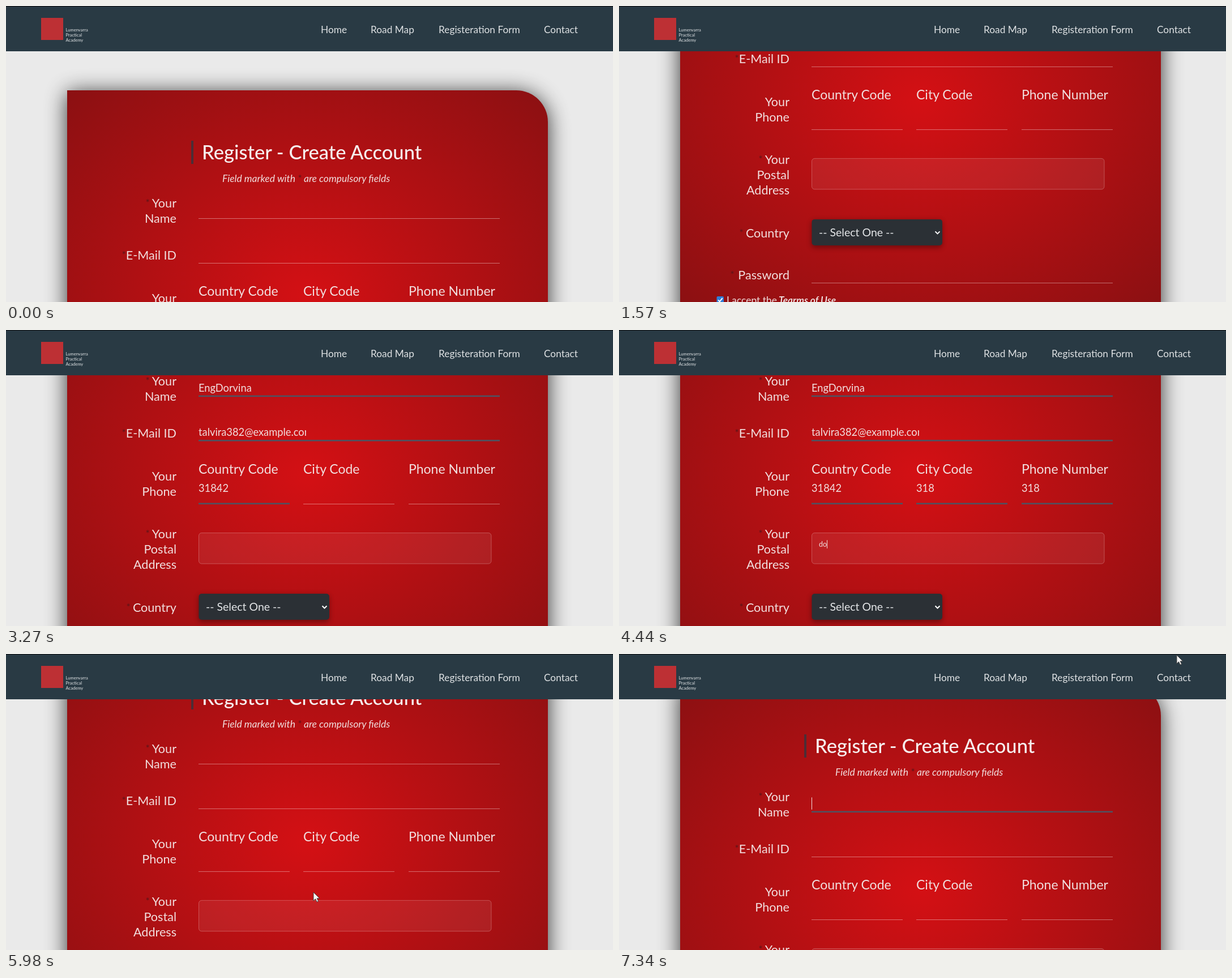
Write an HTML page that moves like this. It is 1072 px wide and 523 px high and loops after 7440 ms.

```html
<!DOCTYPE html>
<html lang="en">
<head>
<meta charset="utf-8">
<title>Register</title>
<style>
html, body { margin: 0; width: 100%; height: 100%; overflow: hidden; background: #eaeaea; }
svg { display: block; width: 1072px; height: 523px; }
text { font-family: Lato, "Open Sans", sans-serif; fill: #f1dede; white-space: pre; }
.nav text, .foot text { fill: #dfe2e4; }
</style>
</head>
<body>
<svg id="stage" viewBox="0 0 1072 523">
  <defs>
    <radialGradient id="glow" r="0.7071">
      <stop offset="0" stop-color="#d41014"/>
      <stop offset="1" stop-color="#8b1012"/>
    </radialGradient>
    <filter id="soft" x="-20%" y="-20%" width="140%" height="140%"><feGaussianBlur stdDeviation="19"/></filter>
    <filter id="softSmall" x="-20%" y="-50%" width="140%" height="200%"><feGaussianBlur stdDeviation="5"/></filter>
    <clipPath id="cardClip"><path id="cardShape"/></clipPath>
    <clipPath id="emailClip"><rect x="338" y="420" width="192" height="40"/></clipPath>
  </defs>
  <rect width="1072" height="523" fill="#eaeaea"/>
  <g id="page"></g>
  <g id="header" class="nav"></g>
  <g id="arrow"><path d="M0 0V15L3.6 11.7L6 17L8.6 15.9L6.2 10.8H10.8Z" fill="#f4f4f4" stroke="#444" stroke-width="1"/></g>
  <g id="hand"><path d="M-2 1C-2-1 1.5-1 1.5 1V7L8 8.5Q10 9 10 11L9 18H0L-6 11C-6 9-4 8.5-2 11Z" fill="#f6f6f6" stroke="#555" stroke-width=".7"/></g>
</svg>
<script>
const LOOP = 7440, RELOAD = 5850, REFOCUS = 6610;
const $ = id => document.getElementById(id);
const page = $('page'), header = $('header');

function add(parent, tag, attrs, content) {
  const el = document.createElementNS('http://www.w3.org/2000/svg', tag);
  set(el, attrs);
  if (content !== undefined) el.textContent = content;
  parent.append(el);
  return el;
}
function set(el, attrs) {
  for (const key in attrs) el.setAttribute(key, attrs[key]);
}
// y is the middle of the capital letters
function label(parent, x, y, size, content, attrs = {}) {
  return add(parent, 'text', { x, y: y + size * 0.36, 'font-size': size, ...attrs }, content);
}
function roundBox(x, y, w, h, [tl, tr, br, bl]) {
  return `M${x + tl} ${y}h${w - tl - tr}a${tr} ${tr} 0 0 1 ${tr} ${tr}v${h - tr - br}` +
    `a${br} ${br} 0 0 1 ${-br} ${br}h${br + bl - w}a${bl} ${bl} 0 0 1 ${-bl} ${-bl}` +
    `v${bl + tl - h}a${tl} ${tl} 0 0 1 ${tl} ${-tl}z`;
}
// rows are [time, value, value...]; linear between rows
function track(rows, t) {
  const i = rows.findIndex(row => row[0] > t);
  if (i < 0) return rows.at(-1).slice(1);
  if (i === 0) return rows[0].slice(1);
  const a = rows[i - 1], b = rows[i], k = (t - a[0]) / (b[0] - a[0]);
  return a.slice(1).map((v, n) => v + (b[n + 1] - v) * k);
}

const END = { 'text-anchor': 'end' }, MID = { 'text-anchor': 'middle' };

// Card
const cardPath = roundBox(108, 149, 849, 893.5, [0, 56, 0, 56]);
set($('cardShape'), { d: cardPath });
add(page, 'path', { d: cardPath, opacity: 0.78, filter: 'url(#soft)', transform: 'translate(0 4)' });
const card = add(page, 'g', { 'clip-path': 'url(#cardClip)' });
add(card, 'rect', { x: 108, y: 149, width: 849, height: 728, fill: 'url(#glow)' });
add(card, 'rect', { x: 108, y: 876, width: 849, height: 167, fill: 'url(#glow)' });

// Headings and labels
add(page, 'rect', { x: 327, y: 238, width: 4, height: 41, fill: '#293a44', opacity: 0.72 });
label(page, 346, 258.5, 34.6, 'Register - Create Account', { 'font-weight': 500, style: 'fill:#f6eeee' });
label(page, 382, 305, 17.5, 'Field marked with', { 'font-style': 'italic' });
label(page, 526, 305, 17.5, 'are compulsory fields', { 'font-style': 'italic' });
[['Your', 348], ['Name', 375], ['E-Mail ID', 440], ['Your', 516], ['Phone', 543], ['Your', 618],
  ['Postal', 645], ['Address', 672], ['Country', 748], ['Password', 822]]
  .forEach(([name, y]) => label(page, 301, y, 21.6, name, END));
[[340, 'Country Code'], [525, 'City Code'], [711, 'Phone Number']]
  .forEach(([x, name]) => label(page, x, 504, 23, name));
[[250, 348], [208, 440], [250, 618], [216, 748], [200, 822], [519, 305]]
  .forEach(([x, y]) => label(page, x, y, 17, '*', { ...MID, style: 'fill:#5c1519' }));

// Inputs
add(page, 'rect', { x: 340.5, y: 616.5, width: 516.5, height: 54.5, rx: 5,
  fill: '#fff', 'fill-opacity': 0.065, stroke: '#fff', 'stroke-opacity': 0.25 });
const fields = [
  { x: 340, y: 360, line: 375, width: 532, value: 'EngDorvina', from: 1830, to: 2480 },
  { x: 340, y: 438, line: 453.5, width: 532, value: 'talvira382@example.com', from: 2580, to: 2900, clip: 'url(#emailClip)' },
  { x: 340, y: 537, line: 565, width: 161, value: '31842', from: 3080, to: 3270 },
  { x: 525, y: 537, line: 565, width: 161, value: '318', from: 3470, to: 3780 },
  { x: 711, y: 537, line: 565, width: 161, value: '318', from: 3880, to: 4200 },
  { x: 353, y: 636.5, value: 'dorm', from: 4260, to: 4600, size: 12.5 },
  { x: 340, y: 820, line: 835.5, width: 532, value: '........', from: 5070, to: 5450, hidden: true }
];
for (const f of fields) {
  f.size ||= 18.3;
  if (f.line) f.rule = add(page, 'rect', { x: f.x, width: f.width });
  f.text = label(page, f.x, f.y, f.size, '', f.clip ? { 'clip-path': f.clip } : {});
  f.caret = add(page, 'rect', { y: f.y - f.size * 0.58, width: 1, height: f.size * 1.17, fill: '#f1dede' });
  if (f.hidden) f.dots = add(page, 'g', {});
}
const masked = fields.at(-1);
for (let i = 0; i < masked.value.length; i++)
  add(masked.dots, 'circle', { cx: 343 + i * 6.1, cy: 820.3, r: 2.5, fill: '#f1e6e6' });

// Country menu
add(page, 'rect', { x: 340, y: 726, width: 231, height: 48, rx: 6, opacity: 0.35, filter: 'url(#softSmall)' });
add(page, 'rect', { x: 340.5, y: 724, width: 230.5, height: 46, rx: 5, fill: '#2b3035' });
const country = label(page, 353, 747, 19.5, '', { style: 'fill:#e4e6e8' });
add(page, 'path', { d: 'M558.5 745.5l4 4 4-4', fill: 'none', stroke: '#fff', 'stroke-width': 2 });

// Terms and buttons
add(page, 'rect', { x: 172.5, y: 860, width: 12.5, height: 12.5, rx: 2, fill: '#2f7cd6' });
add(page, 'path', { d: 'M175 866.5l2.7 2.8 5-6', fill: 'none', stroke: '#fff', 'stroke-width': 2 });
label(page, 190, 866.5, 17.4, 'I accept the');
label(page, 282, 866.5, 17.4, 'Tearms of Use', { 'font-style': 'italic', 'font-weight': 600, style: 'fill:#f6eeee' });
const button = add(page, 'g', {});
const buttonBox = add(button, 'path', { stroke: '#f3dcdc' });
label(button, 0, 0, 19.2, 'Continue >>', { ...MID, 'font-weight': 700, 'letter-spacing': 0.4, style: 'fill:#f6eeee' });
label(page, 620, 940, 20.4, 'Reset');

// Footer
const foot = add(page, 'g', { class: 'foot' });
add(foot, 'rect', { y: 1072, width: 1072, height: 171, fill: '#293a44' });
add(foot, 'rect', { y: 1186, width: 1072, height: 1, fill: '#52616a' });
label(foot, 163, 1103.5, 14.7, 'FOLLOW US', { 'font-weight': 600 });
['#4a84cb', '#d64f4b', '#4fafd2'].forEach((fill, i) =>
  add(foot, 'circle', { cx: 145.7 + i * 59.1, cy: 1152, r: 17.5, fill }));
label(foot, 860, 1130, 14.4, '(+000) 555-01234', MID);
label(foot, 860, 1148, 14.4, '@qvo.gov.xx', MID);
label(foot, 533, 1216, 14.4, 'Copyright 2023 by Lura Venet ®', MID);

// Header
add(header, 'rect', { width: 1072, height: 80, fill: '#293a44' });
add(header, 'rect', { width: 1072, height: 1, fill: '#080b0d' });
add(header, 'rect', { x: 62, y: 21, width: 39, height: 39, fill: '#bd3034' });
['Lumenvarra', 'Practical', 'Academy'].forEach((word, i) => label(header, 105.5, 42.3 + i * 8.8, 7.6, word));
[[556, 'Home'], [644, 'Road Map'], [764, 'Registeration Form'], [950, 'Contact']]
  .forEach(([x, name]) => label(header, x, 41.5, 17.3, name));

const scrollTrack = [[30, 0], [520, 461], [1040, 461], [1130, 719], [1300, 719], [1770, 74], [2920, 74],
  [3050, 258], [4620, 258], [4850, 535], [5849.9, 535], [RELOAD, 0], [6250, 553], [REFOCUS, 553], [6720, 96]];
const hoverTrack = [[5540, 0], [5660, 1], [5849.9, 1], [RELOAD, 0], [6250, 0], [6310, 1], [REFOCUS, 1], [6660, 0]];
const pointerTrack = [[800, 1043, 134], [860, 1038, 153], [1200, 1038, 153], [5460, 600, 330],
  [5620, 543, 421], [6250, 543, 421], [6330, 470, 392], [REFOCUS, 470, 392], [7340, 985, 2]];

function drawField(f, t) {
  const live = t < RELOAD;
  const refocused = f === fields[0] && t >= REFOCUS;
  const share = Math.min(1, Math.max(0, (t - f.from) / (f.to - f.from)));
  const count = live ? Math.floor(share * f.value.length + 1e-6) : 0;
  const active = live && t >= f.from || refocused;
  const typing = live && share > 0 && share < 1;
  if (f.rule) set(f.rule, active
    ? { y: f.line - 1.5, height: 2.6, fill: '#4f5261' }
    : { y: Math.round(f.line), height: 1, fill: 'rgba(255,255,255,.4)' });
  if (f.dots) [...f.dots.children].forEach((dot, i) => set(dot, { visibility: i < count ? 'visible' : 'hidden' }));
  else f.text.textContent = f.value.slice(0, count);
  const length = f.dots ? count * 6.1 : Math.min(f.text.getComputedTextLength(), f.clip ? 190 : 532);
  set(f.caret, { x: f.x + length, visibility: typing || refocused ? 'visible' : 'hidden' });
}

function draw(t) {
  const [scroll] = track(scrollTrack, t), [hover] = track(hoverTrack, t), [px, py] = track(pointerTrack, t);
  set(page, { transform: `translate(0 ${-scroll.toFixed(2)})` });
  fields.forEach(f => drawField(f, t));
  country.textContent = t >= 4900 && t < RELOAD ? 'Egypt' : '-- Select One --';

  const on = 15 * hover, off = 15 - on;
  set(button, { transform: `translate(485.8 940.5) scale(${1 + 0.1 * hover})` });
  set(buttonBox, { d: roundBox(-90.5, -28.2, 181, 56.4, [off, on, off, on]),
    fill: `rgba(43,64,75,${hover})`, 'stroke-opacity': 1 - hover });

  const shown = t >= 800 && t < 1200 || t >= 5460;
  const place = `translate(${px} ${py})`;
  set($('arrow'), { transform: place, visibility: shown && hover === 0 ? 'visible' : 'hidden' });
  set($('hand'), { transform: place, visibility: shown && hover > 0 ? 'visible' : 'hidden' });
}

const start = performance.now();
function tick() {
  draw((performance.now() - start) % LOOP);
  requestAnimationFrame(tick);
}
tick();
</script>
</body>
</html>
```
